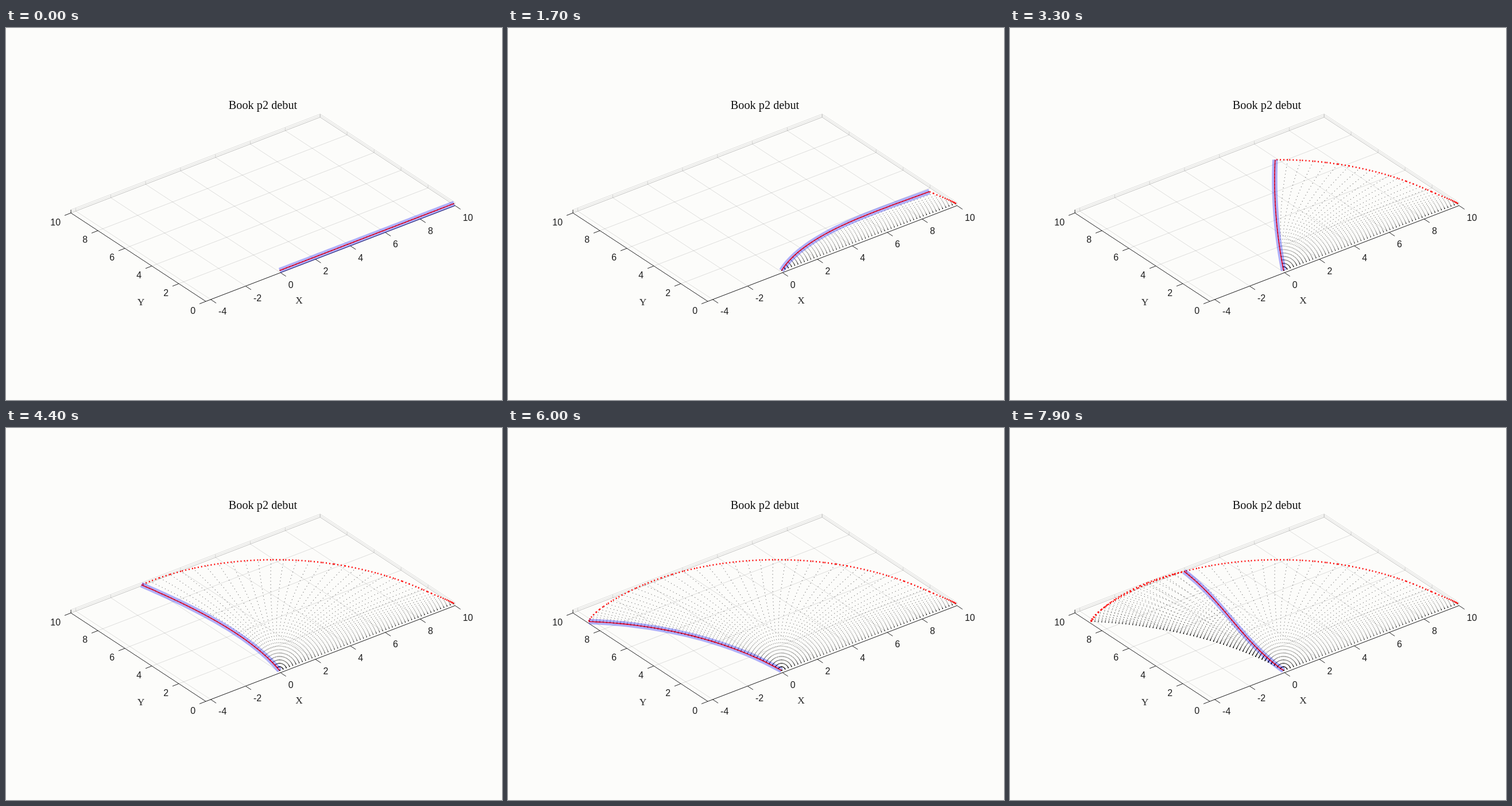
An HTML page with a canvas that plays this animation: 864 by 648 pixels, repeating every 8 s.

```html
<!DOCTYPE html>
<html lang="en">
<head>
<meta charset="utf-8">
<title>Book p2 debut</title>
<style>
  html, body { margin: 0; width: 100%; height: 100%; overflow: hidden; background: #fcfcfa; }
  svg, canvas { position: absolute; left: 0; top: 0; width: 864px; height: 648px; }
  .grid { stroke: #262626; stroke-opacity: .14; }
  .axis { stroke: #262626; }
  .tick { font: 16px "Liberation Sans", Arial, sans-serif; fill: #1c1c1c; }
  .serif { font: 17.5px "Liberation Serif", "Times New Roman", serif; fill: #262626; text-anchor: middle; }
  .title { font-size: 20.3px; fill: #111; }
</style>
</head>
<body>
<svg id="plot" viewBox="0 0 864 648">
  <text class="serif title" x="447.5" y="141">Book p2 debut</text>
  <text class="serif" x="510.5" y="479.5">X</text>
  <text class="serif" x="235" y="483">Y</text>
</svg>
<canvas id="beam" width="864" height="648"></canvas>
<script>
const FRAME = 100, FRAMES = 80, LENGTH = 10, NODES = 50;
const X_MIN = -4.28, BOX = 5.5;
const rad = Math.PI / 180;

// Oblique view of the x-y plane, seen from the given screen origin
const project = (x, y, ox, oy) => [ox + 30.4 * x - 23.5 * y, oy - 11.68 * x - 15.4 * y];
const floor = (x, y) => project(x, y, 478.2, 426.2);

const plot = document.getElementById('plot');

function add(tag, attrs, text) {
  const el = document.createElementNS('http://www.w3.org/2000/svg', tag);
  for (const name in attrs) el.setAttribute(name, attrs[name]);
  if (text !== undefined) el.textContent = text;
  plot.append(el);
}

function line(cls, [x1, y1], [x2, y2]) {
  add('line', { class: cls, x1, y1, x2, y2 });
}

const shift = ([x, y], dx, dy) => [x + dx, y + dy];

function drawAxes() {
  const left = floor(X_MIN, 10), front = floor(X_MIN, 0);
  const right = floor(10, 0), back = floor(10, 10);

  for (let x = -4; x <= 10; x += 2) {
    const near = floor(x, 0), far = floor(x, 10);
    line('grid', near, far);
    line('grid', far, shift(far, 0, -BOX));
    line('axis', near, shift(near, 9.5, 6.3));
    add('text', { class: 'tick', x: near[0] + 13.5, y: near[1] + 26.3 }, x);
  }
  for (let y = 0; y <= 10; y += 2) {
    const near = floor(X_MIN, y), far = floor(10, y);
    line('grid', near, far);
    line('grid', far, shift(far, 0, -BOX));
    line('axis', near, shift(near, -11, 4.3));
    add('text', { class: 'tick', x: near[0] - 18, y: near[1] + 21.5, 'text-anchor': 'end' }, y);
  }
  for (const lift of [0, -BOX / 2, -BOX]) {
    line('grid', shift(left, 0, lift), shift(back, 0, lift));
    line('grid', shift(back, 0, lift), shift(right, 0, lift));
  }
  line('axis', left, front);
  line('axis', front, right);
  line('axis', left, shift(left, 0, -BOX));
}

// [step, root slope, tip bearing, tip slope] in degrees
const KEYS = [
  [0, 0, 0, 0],
  [8, 12, 1.3, -1.5],
  [17, 35, 9.26, -1],
  [25, 50, 28.9, 20],
  [33, 58, 54.5, 51],
  [44, 75, 91.55, 102],
  [53, 89, 110.5, 119],
  [60, 94, 115.9, 139],
  [67, 88, 107.9, 117],
  [73, 87, 95.5, 101],
  [79, 88, 79.2, 85.7]
];

function slope(i, c) {
  if (i === 0) return 0;
  const a = KEYS[i - 1], b = KEYS[Math.min(i + 1, KEYS.length - 1)];
  return (b[c] - a[c]) / (b[0] - a[0]);
}

// Cubic Hermite interpolation of one column of KEYS
function sample(step, c) {
  let i = 0;
  while (i < KEYS.length - 2 && step > KEYS[i + 1][0]) i++;
  const a = KEYS[i], b = KEYS[i + 1], h = b[0] - a[0], u = (step - a[0]) / h;
  const v = 1 - u;
  return a[c] * v * v * (1 + 2 * u) + b[c] * u * u * (3 - 2 * u)
       + h * u * v * (v * slope(i, c) - u * slope(i + 1, c));
}

// Beam centre line: slope is quadratic along the length, turned so the tip has its bearing
function beamShape(step) {
  const [root, bearing, tip] = [1, 2, 3].map(c => sample(step, c));
  const c2 = 3 * (root + tip) - 6 * bearing, c1 = tip - root - c2;
  const ds = LENGTH / NODES, pts = [[0, 0]];
  let x = 0, y = 0;
  for (let i = 0; i < NODES; i++) {
    const s = (i + .5) / NODES, phi = (root + c1 * s + c2 * s * s) * rad;
    x += ds * Math.cos(phi);
    y += ds * Math.sin(phi);
    pts.push([x, y]);
  }
  const turn = bearing * rad - Math.atan2(y, x);
  const cos = Math.cos(turn), sin = Math.sin(turn);
  return pts.map(([px, py]) => project(px * cos - py * sin, px * sin + py * cos, 476.6, 422.5));
}

const shapes = Array.from({ length: FRAMES }, (_, i) => beamShape(i));
const ctx = document.getElementById('beam').getContext('2d');
ctx.beginPath();
ctx.rect(0, 0, 782, 648);
ctx.clip();
ctx.lineJoin = 'round';

function stroke(pts, color, width, dash = []) {
  ctx.strokeStyle = color;
  ctx.lineWidth = width;
  ctx.setLineDash(dash);
  ctx.beginPath();
  pts.forEach(p => ctx.lineTo(...p));
  ctx.stroke();
}

const drawDots = pts => stroke(pts, 'rgba(0,0,0,.55)', 1.1, [1.2, 4.8]);

function draw(step) {
  ctx.clearRect(0, 0, 864, 648);
  for (let i = 0; i <= step; i++) {
    drawDots(shapes[i]);
    if (i) stroke([shapes[i - 1][NODES], shapes[i][NODES]], '#f00', 2.5, [1.9, 4.1]);
  }
  const now = shapes[step];
  stroke(now, 'rgba(0,0,255,.3)', 9.5);
  stroke(now, '#f0001c', 1.6);
  drawDots(now);
}

let shown = -1;
const start = performance.now();
function tick() {
  const step = Math.floor((performance.now() - start) / FRAME) % FRAMES;
  if (step !== shown) draw(shown = step);
  requestAnimationFrame(tick);
}

drawAxes();
tick();
</script>
</body>
</html>
```
